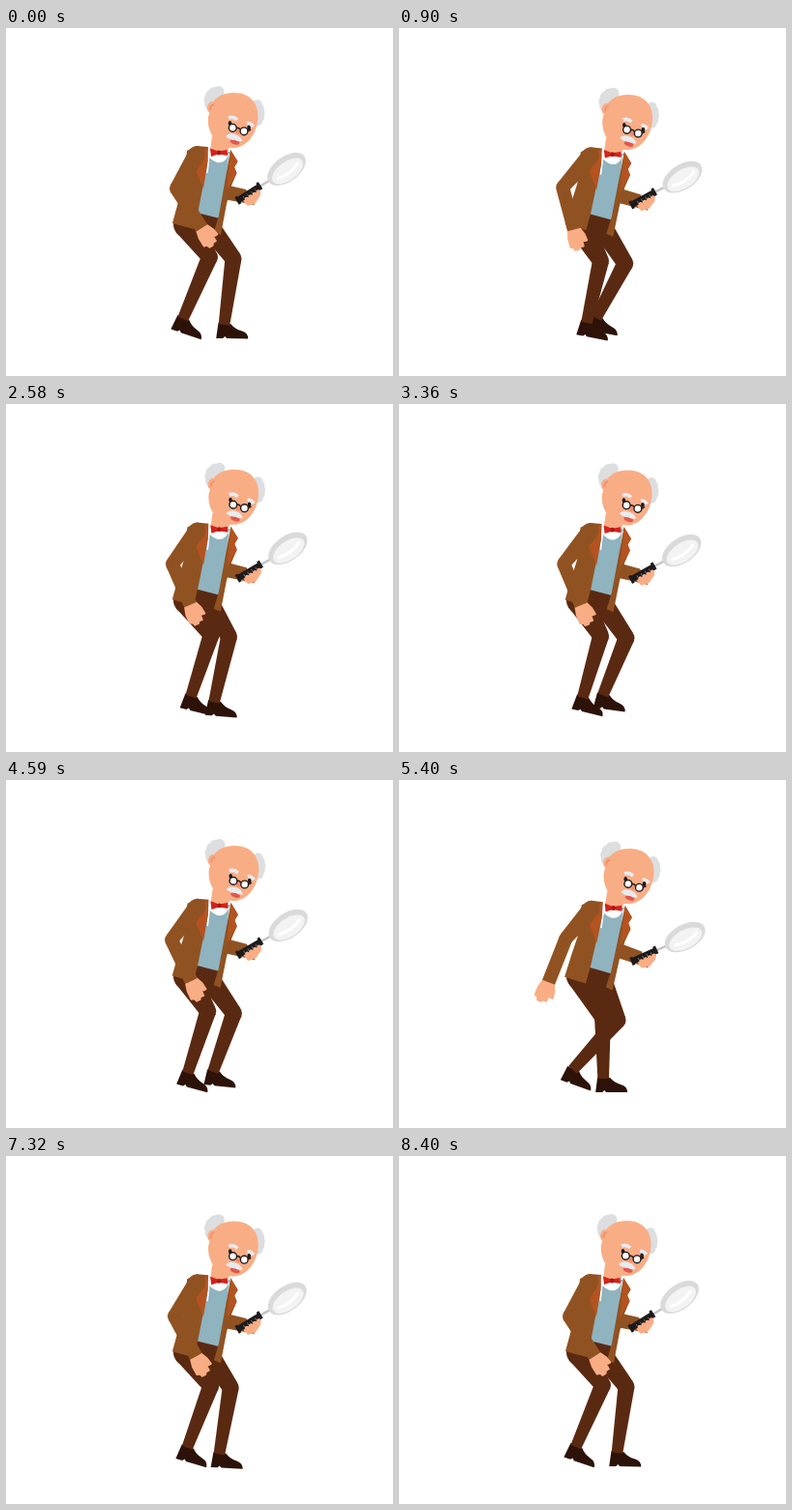
An HTML page with a canvas for the animation above (8.43 s loop, 400 by 360 pixels).

```html
<!DOCTYPE html>
<html lang="en">
<head>
<meta charset="utf-8">
<title>Walking with a magnifier</title>
<style>
  html, body { margin: 0; width: 100%; height: 100%; overflow: hidden; background: #fff; }
  canvas { display: block; width: 400px; height: 360px; }
</style>
</head>
<body>
<canvas id="stage"></canvas>
<script>
const LOOP = 8430, STEP = 30, STRIDE = 1200;
const canvas = document.getElementById('stage');
const ratio = window.devicePixelRatio || 1;
canvas.width = 400 * ratio;
canvas.height = 360 * ratio;
const ctx = canvas.getContext('2d');

const C = {
  coat: '#915222', lapel: '#b4531f', vest: '#8fb3bf', trousers: '#5a2912',
  shoe: '#2c1208', skin: '#f9ad85', ear: '#f18e6c', hair: '#dcdee0',
  brow: '#e6ebf0', tie: '#d3221c', ink: '#1d1a1b', rim: '#dadada', lens: '#f3f3f3'
};

// Every joint swings once per stride; lead shifts its peak earlier, in ms
const wave = (t, mid, amp, lead = 0, rate = 1) =>
  mid + amp * Math.cos(2 * Math.PI * rate * (t + lead) / STRIDE);

const farLeg = t => ({
  hip: [208, 203, 11],
  knee: [wave(t, 230.5, 5.5, 120), wave(t, 243.5, 5, -600)],
  ankle: [wave(t, 202.5, 23, 10), wave(t, 302.5, 5, -150)],
  tilt: wave(t, 10.5, -9.5)
});

const nearLeg = t => ({
  hip: [187, 203, 14],
  knee: [wave(t, 210.5, 2, -300), wave(t, 241, -4)],
  ankle: [wave(t, 197, -14.5, 40), wave(t, 304, -4)],
  tilt: wave(t, 9.5, 9.5, 30)
});

const armPose = t => ({
  elbow: [wave(t, 171.5, 2) + wave(t, 0, 2.5, 0, 2), wave(t, 164, 2)],
  wrist: [wave(t, 179, 23.5, 20), wave(t, 207.5, -0.5)]
});

function fill(d, color) {
  ctx.fillStyle = color;
  ctx.fill(new Path2D(d));
}

function line(d, color, width) {
  ctx.strokeStyle = color;
  ctx.lineWidth = width;
  ctx.stroke(new Path2D(d));
}

function oval(x, y, rx, ry, color, turn = 0) {
  ctx.fillStyle = color;
  ctx.beginPath();
  ctx.ellipse(x, y, rx, ry, turn, 0, 7);
  ctx.fill();
}

function moved(x, y, deg, draw) {
  ctx.save();
  ctx.translate(x, y);
  ctx.rotate(deg * Math.PI / 180);
  draw();
  ctx.restore();
}

// Tapered bone with a round start and a flat end
function bone([x1, y1], r1, [x2, y2], r2, color) {
  const len = Math.hypot(x2 - x1, y2 - y1);
  const nx = (y1 - y2) / len, ny = (x2 - x1) / len;
  oval(x1, y1, r1, r1, color);
  fill(`M${x1 + nx * r1},${y1 + ny * r1} L${x2 + nx * r2},${y2 + ny * r2}
    L${x2 - nx * r2},${y2 - ny * r2} L${x1 - nx * r1},${y1 - ny * r1} Z`, color);
}

function leg({ hip, knee, ankle, tilt }) {
  moved(...ankle, tilt, () =>
    fill('M-6,-1 L7,0 Q11,5 18,7 Q25,9 25,15 L3,15 L1,13 L-1,15 L-8,15 Z', C.shoe));
  bone(hip, hip[2], knee, 8.5, C.trousers);
  bone(knee, 8.5, [ankle[0], ankle[1] + 1], 5.8, C.trousers);
}

function magnifierArm(sway) {
  moved(240 + 2.5 * sway, 172 + 5 * sway, 6 * sway, () => {
    ctx.translate(-240, -172);
    fill('M226,162 L248,167 L257,183 L241,180 L224,177 Z', C.coat);
    line('M262,164 L272,158', '#c4c4c4', 2.5);
    oval(290, 146, 22.8, 13, C.rim, -0.635);
    oval(291, 148, 18.5, 9.6, C.lens, -0.635);
    line('M280,156 Q294,152 302,139', '#fff', 3);
    fill('M244,174 L255,165 L263,168 L263,173 L258,181 L250,184 L246,180 Z', C.skin);
    line('M240,178 L263,163.5', C.ink, 6.5);
    line('M237.5,174.5 L242,182 M259.5,160 L264,167', C.ink, 3);
    for (let i = 0; i < 4; i++) {
      line(`M${245 + 4 * i},${174 - 2.5 * i} l3,4`, '#6d6a6b', 1);
      oval(249 + 4 * i, 177 - 2.5 * i, 2.3, 2.3, C.skin);
    }
  });
}

function torso() {
  fill('M209,128 L231,128 L232,136 L221,197 L197,191 Z', C.vest);
  line('M210,130 L208,150 M231,130 L229,150', '#fff', 1.6);
  fill('M209,127 L230,131 Q226,141 218,139 Q212,137 209,132 Z', '#fff');
  fill('M232,126 L239.5,138 L236,144 L238.5,150 L233,163 L228,182 L222,214 L215,211 L220,194 Z', C.coat);
  fill('M197,122 L209,123 L208,140 L198.5,190 L194,208 L172,202 L178,180 L184,160 L185,148 L187,127 Z', C.coat);
  fill('M208,123 L195,137 L200,140 L196,147 L204,166 L208.5,138 Z', C.lapel);
  fill('M232,126 L239.5,138 L236,144 L238.5,150 L228,168 L231,140 Z', C.lapel);
}

function head() {
  // Two curly tufts, each a short arc of curls
  for (let i = 0; i < 5; i++) {
    const a = 2.7 + 0.52 * i, b = -0.75 + 0.36 * i;
    oval(219 + 8.5 * Math.cos(a), 75 + 9 * Math.sin(a), 6, 6, C.hair);
    oval(252 + 10.5 * Math.cos(b), 88 + 13 * Math.sin(b), 5, 5, C.hair);
  }
  fill('M213,112 L211,127 Q218,135 229,128 L233,118 Z', C.skin);
  fill('M211,85 C213,72 223,67 236,67 C252,67 261,78 260.5,92 C260,108 250,123 236,124 C219,125 207,108 209,92 Z', C.skin);
  oval(212.5, 82, 4.5, 6, C.skin, 0.3);
  line('M211.5,85 Q210.5,80 215,79', C.ear, 1.6);
  line('M230,93 Q235,91 239,95 M249,98.5 Q253,98 255.5,102', C.brow, 3.6);
  oval(231.5, 98.5, 1.8, 2.5, C.ink);
  oval(251, 103, 1.8, 2.5, C.ink);
  oval(240, 107, 2.2, 3, C.ear, 0.3);
  for (const [x, y] of [[234.3, 103.3], [246, 106.8]]) {
    oval(x, y, 4.6, 4.6, C.ink);
    oval(x, y, 3.2, 3.2, '#fff');
  }
  line('M238,103.5 Q240.5,102.5 242,105 M250,106.5 L253,105', C.ink, 1.5);
  oval(236.5, 118, 5, 2.4, '#e2574b', 0.3);
  fill('M227,112 Q230,108 236,110 Q242,111 244.5,117 Q240,118 237,116 Q231,116 227,112 Z', C.brow);
  fill('M211,124.5 L219.5,127.5 L228.5,126 L229,132 L219.5,130.5 L212,133 Z', C.tie);
  oval(220, 129, 2.2, 2.4, '#b0160f');
}

function nearArm({ elbow, wrist }) {
  const turn = Math.atan2(elbow[0] - wrist[0], wrist[1] - elbow[1]) * 180 / Math.PI;
  moved(...wrist, turn, () => {
    const hand = 'M-6,0 L6,0 L9,7 L10,14 L7,14 L5,10 L5,19 L1,19 L0,21 L-4,21 L-5,18 L-8,17 L-8,8 Z';
    fill(hand, C.skin);
    line(hand, C.skin, 2);
  });
  bone([197, 131], 9, elbow, 7, C.coat);
  bone(elbow, 7, wrist, 7, C.coat);
}

function draw(t) {
  const sway = wave(t, 0.5, -0.5);
  const inBody = part => moved(195 - sway, 205 + 2.6 * sway, 2 * sway, () => {
    ctx.translate(-195, -205);
    part();
  });
  ctx.setTransform(ratio, 0, 0, ratio, 0, 0);
  ctx.lineJoin = 'round';
  ctx.fillStyle = '#fff';
  ctx.fillRect(0, 0, 400, 360);
  inBody(() => magnifierArm(sway));
  leg(farLeg(t));
  leg(nearLeg(t));
  inBody(() => {
    fill('M176,198 L197,188 L220,193 L219,208 L198,212 Z', C.trousers);
    torso();
    head();
    nearArm(armPose(t));
  });
}

const start = performance.now();
function tick() {
  const t = (performance.now() - start) % LOOP;
  draw(Math.floor(t / STEP) * STEP % STRIDE);
  requestAnimationFrame(tick);
}
tick();
</script>
</body>
</html>
```
